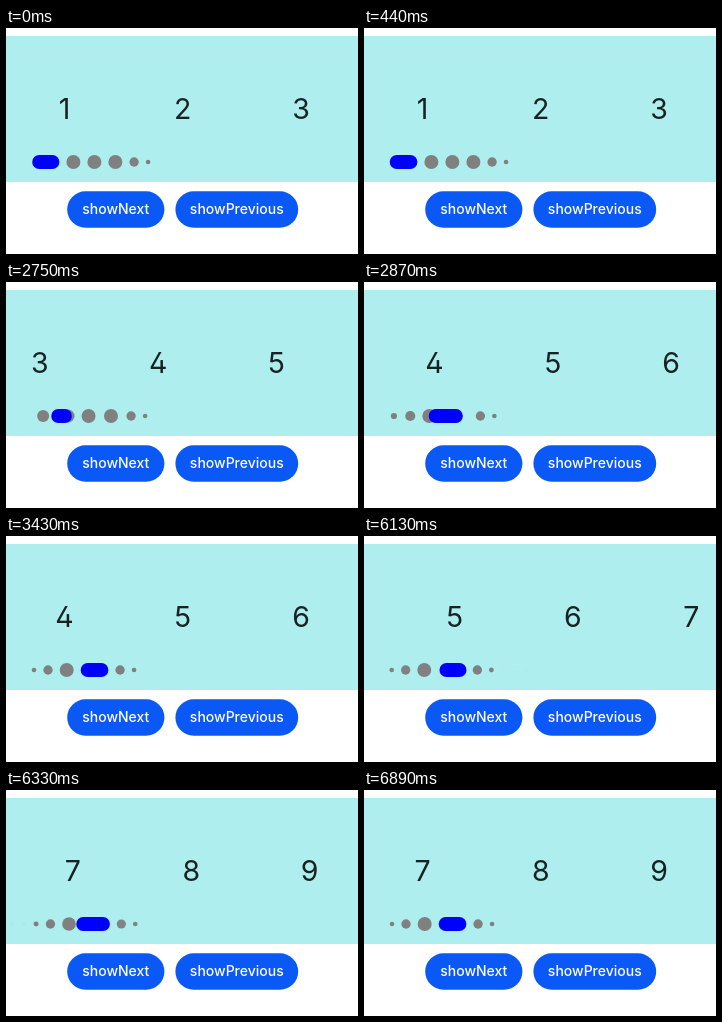
These frames come from a looping animation (352x226 px, 6.93 s). An HTML page with a canvas:

```html
<!DOCTYPE html>
<html lang="en">
<head>
<meta charset="utf-8">
<title>Swiper with indicator</title>
<style>
  html, body { margin: 0; width: 100%; height: 100%; overflow: hidden; background: #fff; }
  #stage { position: relative; width: 352px; height: 226px; overflow: hidden; font-family: Inter, "Open Sans", sans-serif; }
  canvas { position: absolute; left: 0; top: 0; width: 352px; height: 226px; }
  #track { position: absolute; left: 0; top: 60.5px; }
  #track span {
    position: absolute; width: 60px; margin-left: -30px; text-align: center;
    font-size: 28.5px; line-height: 40px; color: rgba(0, 0, 0, .86);
    font-feature-settings: "cv02";
  }
  .label {
    position: absolute; top: 163.3px; line-height: 36.4px; text-align: center;
    font-size: 14px; font-weight: 500; color: #fff; white-space: nowrap;
  }
</style>
</head>
<body>
<div id="stage">
  <canvas id="view"></canvas>
  <div id="track"></div>
</div>
<script>
const LOOP = 6930, TICK = 40;
const PITCH = 118.3, FIRST = 58.5, PER_PAGE = 3;
const DOT_Y = 134, DOT_LEFT = 25.7, GAP = 7, PILL = 27.7;
const BIG = 7, MID = 4.67, TINY = 2.33;

// Lead times are the ms already elapsed when a swipe first shows.
const swipes = [
  { at: 2630, pageLead: 17, dotLead: -40, rate: 1 },
  { at: 6130, pageLead: 51, dotLead: 16, rate: 1.12 }
];
const buttons = [
  { text: "showNext", x: 61.2, w: 97.2 },
  { text: "showPrevious", x: 169.4, w: 122.8 }
];

const stage = document.getElementById("stage");
const track = document.getElementById("track");
const canvas = document.getElementById("view");
const ctx = canvas.getContext("2d");
const ratio = window.devicePixelRatio || 1;
canvas.width = 352 * ratio;
canvas.height = 226 * ratio;

for (let i = 0; i < 9; i++) {
  const digit = document.createElement("span");
  digit.textContent = i + 1;
  digit.style.left = FIRST + i * PITCH + "px";
  track.append(digit);
}
for (const b of buttons) {
  const label = document.createElement("div");
  label.className = "label";
  label.textContent = b.text;
  label.style.left = b.x + "px";
  label.style.width = b.w + "px";
  stage.append(label);
}

const mix = (a, b, p) => a + (b - a) * p;

// Underdamped spring: stiffness 328, damping 34, mass 1.
function pageEase(ms) {
  if (ms <= 0) return 0;
  const t = ms / 1000, k = 17, w = Math.sqrt(328 - k * k);
  return 1 - Math.exp(-k * t) * (Math.cos(w * t) + k / w * Math.sin(w * t));
}

function smooth(ms, span) {
  const x = Math.min(1, Math.max(0, ms / span));
  return x * x * (3 - 2 * x);
}

function tailEase(ms) {
  const x = Math.max(0, ms) * 0.0152;
  return 1 - Math.exp(-x) * (1 + x);
}

// Dots of one resting state, by item index; those outside the window are clear.
function layout(start, sizes) {
  const dots = [];
  let x = DOT_LEFT, pill = 0;
  sizes.forEach((r, i) => {
    const w = r ? 2 * r : PILL;
    if (!r) pill = x;
    dots[start + i] = { x: x + w / 2, r: r || BIG, alpha: 1 };
    x += w + GAP;
  });
  const step = 2 * TINY + GAP, end = start + sizes.length;
  for (let i = 0; i < 9; i++) {
    if (i < start) dots[i] = { x: DOT_LEFT + TINY - (start - i) * step, r: TINY, alpha: 0 };
    if (i >= end) dots[i] = { x: x + TINY + (i - end) * step, r: TINY, alpha: 0 };
  }
  return { dots, pill };
}

const centred = [TINY, MID, BIG, 0, MID, TINY];
const states = [
  layout(0, [0, BIG, BIG, BIG, MID, TINY]),
  layout(0, centred),
  layout(3, centred)
];

function capsule(x, y, w, h, color) {
  ctx.fillStyle = color;
  ctx.beginPath();
  ctx.roundRect(x, y, w, h, h / 2);
  ctx.fill();
}

function drawIndicator(from, to, target, ms, settle) {
  const p = smooth(ms, 270);
  from.dots.forEach((a, i) => {
    const b = to.dots[i];
    ctx.globalAlpha = mix(a.alpha, b.alpha, p);
    ctx.fillStyle = "#808080";
    ctx.beginPath();
    ctx.arc(mix(a.x, b.x, p), DOT_Y, mix(a.r, b.r, p), 0, 2 * Math.PI);
    ctx.fill();
  });
  ctx.globalAlpha = 1;

  // The pill travels along the strip while the strip slides the other way.
  const shift = from.dots[target].x - to.dots[target].x;
  const travel = to.pill - from.pill + shift;
  const base = from.pill - shift * p;
  const left = base + travel * tailEase(ms) + settle;
  const right = base + travel * smooth(ms, 250) + PILL;
  capsule(left, DOT_Y - BIG, right - left, 2 * BIG, "#0000ff");
}

function draw(time) {
  const n = time < swipes[0].at ? -1 : time < swipes[1].at ? 0 : 1;
  let page = 0, dotMs = 0;
  if (n >= 0) {
    const s = swipes[n];
    const ms = Math.floor((time - s.at) / TICK + 0.001) * TICK * s.rate;
    page = n + pageEase(ms + s.pageLead);
    dotMs = ms + s.dotLead;
  }
  track.style.transform = `translateX(${-page * PER_PAGE * PITCH}px)`;

  ctx.setTransform(ratio, 0, 0, ratio, 0, 0);
  ctx.fillStyle = "#fff";
  ctx.fillRect(0, 0, 352, 226);
  ctx.fillStyle = "#afeeee";
  ctx.fillRect(0, 8, 352, 146);
  for (const b of buttons) capsule(b.x, 163.3, b.w, 36.4, "#0a59f7");

  const k = Math.max(0, n);
  const settle = n < 0 ? 0.5 * Math.exp(-time / 150) : 0;
  drawIndicator(states[k], states[k + 1], (k + 1) * PER_PAGE, dotMs, settle);
}

const begin = performance.now();
function frame() {
  draw((performance.now() - begin) % LOOP);
  requestAnimationFrame(frame);
}
frame();
</script>
</body>
</html>
```
